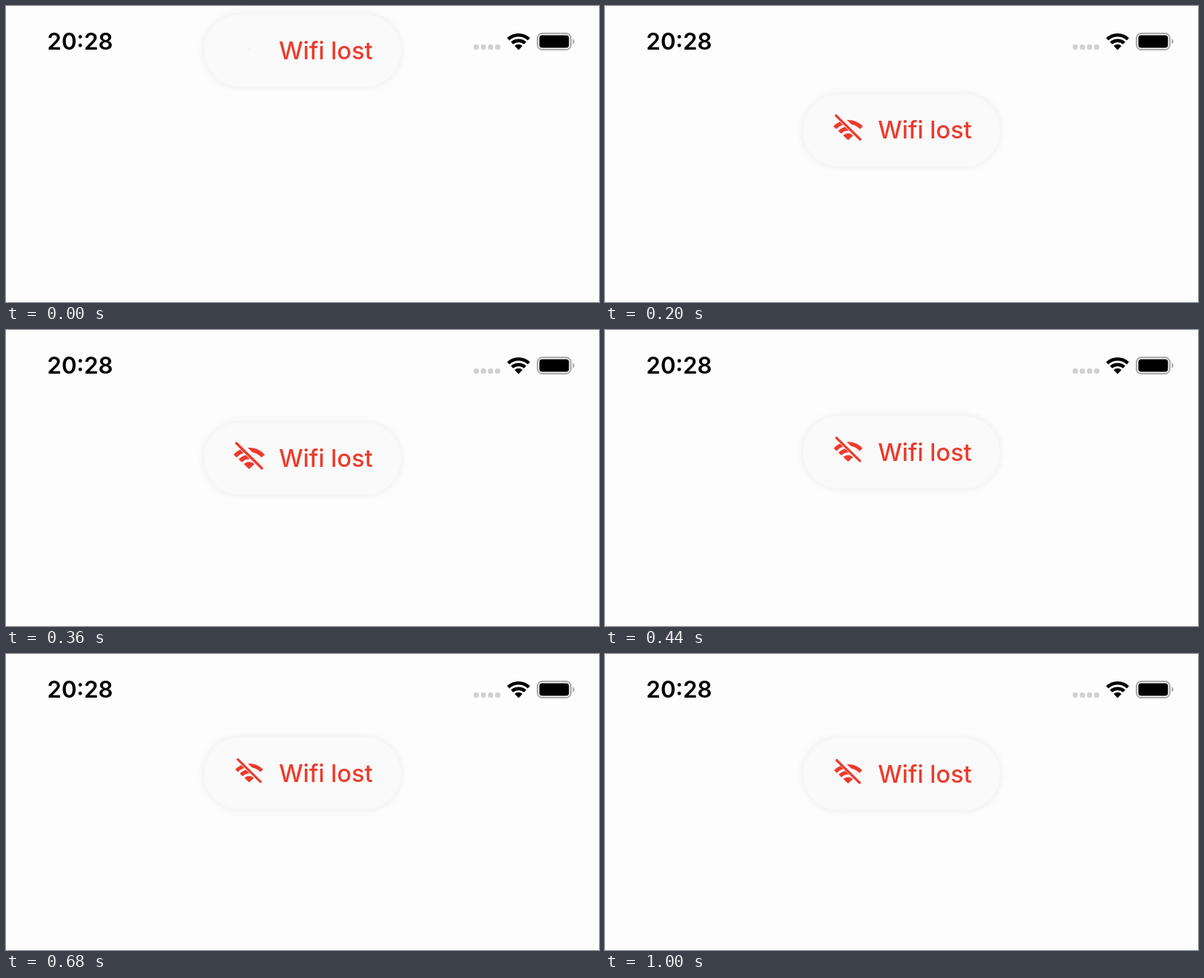
Write an HTML page that moves like this. It is 800 px wide and 400 px high and loops after 10000 ms.

```html
<!DOCTYPE html>
<html lang="en">
<head>
<meta charset="utf-8">
<title>Wifi lost</title>
<style>
  html, body { margin: 0; width: 100%; height: 100%; overflow: hidden; background: #fefdfe; }
  svg { display: block; width: 800px; height: 400px; }
  text { font-family: Inter, "Liberation Sans", sans-serif; text-anchor: middle; }
  .clock { font-size: 31px; font-weight: 600; }
  .label { font-size: 32.5px; font-weight: 500; }
  .shadow { fill: #000; opacity: .075; filter: blur(6px); }
  .red { fill: #ed3b2c; }
  .arc { fill: none; }
  .red .arc, .slash { stroke: #ed3b2c; }
  .black .arc { stroke: #000; }
  .slash, .gap { stroke-linecap: round; }
  .gap { stroke: #fafafb; }
</style>
</head>
<body>
<svg viewBox="0 0 800 400">
  <rect width="800" height="400" fill="#fefdfe"/>
  <rect y="398" width="800" height="2" fill="#fbfafb"/>

  <text class="clock" x="100" y="59">20:28</text>

  <g fill="#d1d0d3">
    <rect x="631" y="52" width="7" height="7" rx="2.5"/>
    <rect x="640.6" y="52" width="7" height="7" rx="2.5"/>
    <rect x="650.2" y="52" width="7" height="7" rx="2.5"/>
    <rect x="659.8" y="52" width="7" height="7" rx="2.5"/>
  </g>

  <g class="black" id="signal" transform="translate(691.5 59.5)"></g>

  <rect x="717" y="37" width="45" height="22" rx="6.5" fill="none" stroke="#a9a8aa" stroke-width="2"/>
  <rect x="719.5" y="39.5" width="40" height="17" rx="4"/>
  <path d="M764.5 44a4.5 4.5 0 0 1 0 8z" fill="#a9a8aa"/>

  <g id="toast">
    <rect class="shadow" x="267" y="113.5" width="266" height="98" rx="49"/>
    <rect x="267" y="113.5" width="266" height="98" rx="49" fill="#fafafb"/>
    <text class="label red" x="431.5" y="174">Wifi lost</text>
    <g id="icon">
      <g class="red" id="lost" transform="translate(0 15)"></g>
      <path class="gap" d="M-14.5 -18L17.5 13.5" stroke-width="8"/>
      <path class="slash" d="M-15.5 -16.5L15.5 14" stroke-width="3.2"/>
    </g>
  </g>
</svg>
<script>
  const byId = id => document.getElementById(id);

  // Fan of two bands and a wedge, with its tip at the local origin.
  function drawFan(id, radius, degrees) {
    const angle = degrees * Math.PI / 180;
    const arc = r => {
      const x = r * Math.sin(angle), y = -r * Math.cos(angle);
      return `${-x} ${y}A${r} ${r} 0 0 1 ${x} ${y}`;
    };
    const width = radius * 0.2;
    const band = r => `<path class="arc" d="M${arc(r)}" stroke-width="${width}"/>`;
    byId(id).innerHTML = band(radius * 0.9) + band(radius * 0.57) +
      `<path d="M0 0L${arc(radius * 0.34)}Z"/>`;
  }
  drawFan('signal', 22.5, 43.5);
  drawFan('lost', 26, 47);

  const LOOP = 10000, STEP = 40, SETTLED = 1000;
  const DROP = 104.7, DECAY = 6.28, OMEGA = 10.88;

  // Remaining distance of an underdamped spring released from rest.
  function remaining(ms) {
    if (ms >= SETTLED) return 0;
    const ease = Math.min(1, Math.max(0, (ms - 120) / 80));
    const t = (ms + 18 - 10 * ease) / 1000;
    return Math.exp(-DECAY * t) *
      (Math.cos(OMEGA * t) + DECAY / OMEGA * Math.sin(OMEGA * t));
  }

  const start = performance.now();
  function render() {
    const elapsed = (performance.now() - start) % LOOP;
    const rest = remaining(Math.floor(elapsed / STEP) * STEP);
    byId('toast').setAttribute('transform', `translate(0 ${-DROP * rest})`);
    byId('icon').setAttribute('transform', `translate(328 160) scale(${1 - rest})`);
    requestAnimationFrame(render);
  }
  render();
</script>
</body>
</html>
```
